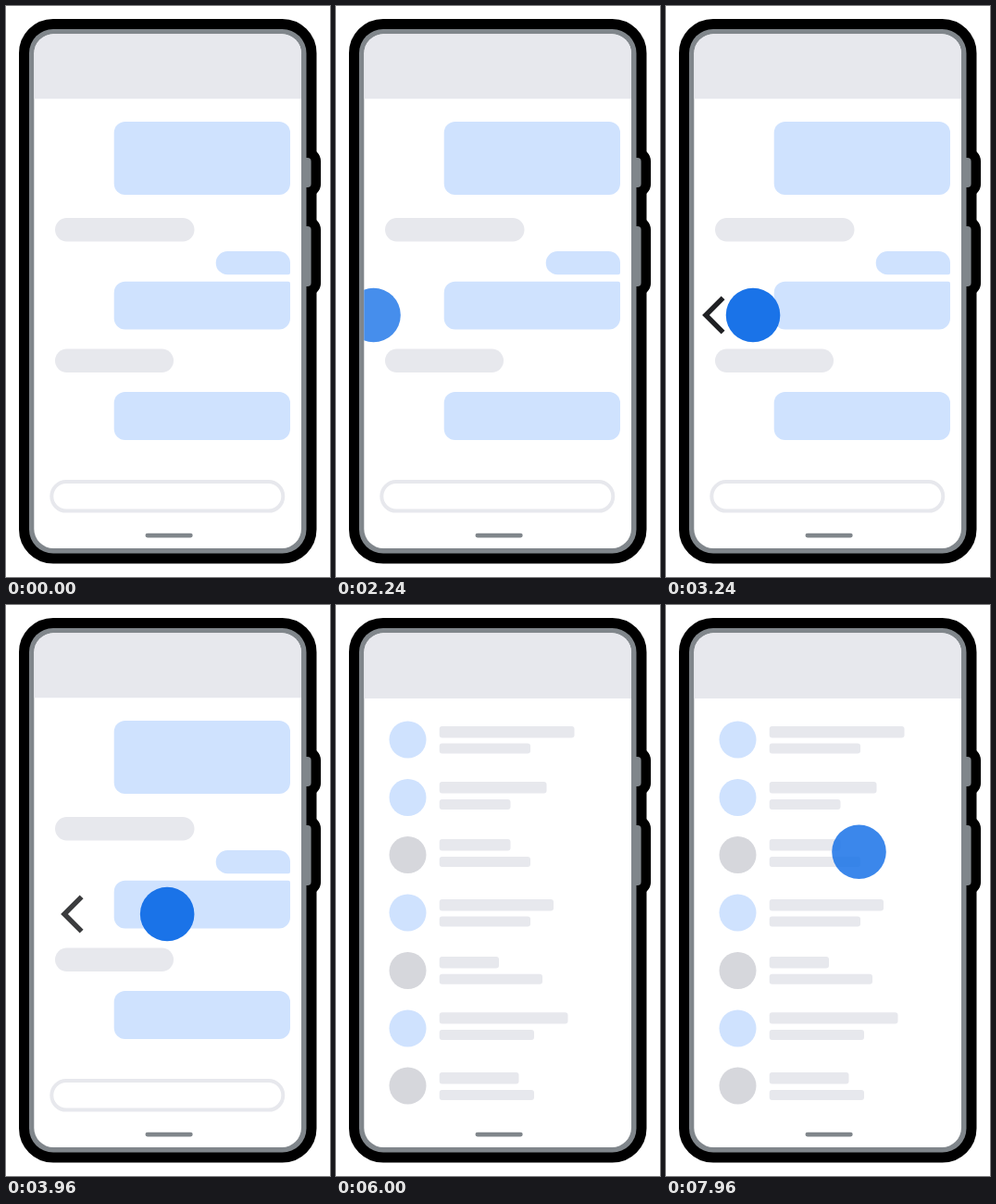
Write an HTML page with a canvas that moves like this. It is 350 by 617 pixels and loops after 8 s.

```html
<!DOCTYPE html>
<html lang="en">
<head>
<meta charset="utf-8">
<title>Back gesture</title>
<style>
html, body { margin: 0; width: 100%; height: 100%; overflow: hidden; background: #fff; }
canvas { display: block; width: 350px; height: 617px; }
</style>
</head>
<body>
<canvas id="stage"></canvas>
<script>
const W = 350, H = 617, LOOP = 8000;
const GREY = '#e7e8ed', MID = '#d6d7dc', PALE = '#cfe2fe', BLUE = '#1a73e8', METAL = '#80868b', INK = '#202124';
const canvas = document.getElementById('stage');
const ctx = canvas.getContext('2d');
const dpr = window.devicePixelRatio || 1;
canvas.width = Math.round(W * dpr);
canvas.height = Math.round(H * dpr);

// Row: centre y, avatar colour, bar offsets from centre, bar right edges
const ROWS = [
  [145.5, PALE, -14.5, 4, 257.5, 210],
  [208, PALE, -17, 2, 227.5, 188.5],
  [270, MID, -17, 2, 188.5, 210],
  [332.5, PALE, -14.5, 4, 235, 210],
  [395, MID, -15, 3.7, 176, 223],
  [457.5, PALE, -17.3, 1.5, 250.5, 214],
  [519.5, MID, -14.5, 4.5, 197.5, 214]
];

const linear = (t, a, b) => Math.min(1, Math.max(0, (t - a) / (b - a)));
const sine = (t, a, b) => 0.5 - 0.5 * Math.cos(Math.PI * linear(t, a, b));
const cubic = (t, a, b) => {
  const x = linear(t, a, b);
  return x < 0.5 ? 4 * x ** 3 : 1 - 4 * (1 - x) ** 3;
};
const out = (t, a, b) => 1 - (1 - linear(t, a, b)) ** 3;

// Rounded box given by its edges
function path(l, t, r, b, radius) {
  ctx.beginPath();
  ctx.roundRect(l, t, r - l, b - t, radius);
}

function box(color, l, t, r, b, radius) {
  path(l, t, r, b, radius);
  ctx.fillStyle = color;
  ctx.fill();
}

function disc(color, x, y, r) {
  ctx.beginPath();
  ctx.arc(x, y, r, 0, Math.PI * 2);
  ctx.fillStyle = color;
  ctx.fill();
}

function layer(alpha, scale, draw) {
  if (alpha <= 0) return;
  ctx.save();
  ctx.globalAlpha = alpha;
  ctx.translate(177, 300);
  ctx.scale(scale, scale);
  ctx.translate(-177, -300);
  draw();
  ctx.restore();
}

function body() {
  const parts = [
    [320, 164, 329.6, 196, 4],
    [320, 238, 329.6, 303, 4],
    [25, 25, 324.5, 591.5, 26]
  ];
  ctx.strokeStyle = '#000';
  for (const p of parts) {
    path(...p);
    ctx.lineWidth = p[4] > 4 ? 22 : 21;
    ctx.stroke();
  }
  for (const p of parts) box(METAL, ...p);
}

function chat() {
  box(PALE, 116.7, 125, 307, 204, 12);
  box(GREY, 53, 229, 203.5, 254.5, 12.7);
  box(PALE, 226.7, 265, 307, 290.3, [12.6, 12.6, 2, 12.6]);
  box(PALE, 116.7, 297.7, 307, 349.5, [12, 2, 12, 12]);
  box(GREY, 53, 370.5, 181, 396, 12.7);
  box(PALE, 116.7, 417, 307, 469, 12);
  path(49.3, 514, 299.3, 545.6, 15.8);
  ctx.strokeStyle = GREY;
  ctx.lineWidth = 4;
  ctx.stroke();
}

function list() {
  for (const [y, color, top, low, end1, end2] of ROWS) {
    disc(color, 77.5, y, 20);
    box(GREY, 111.7, y + top, end1, y + top + 12.4, 3);
    box(GREY, 111.7, y + low, end2, y + low + 11, 3);
  }
}

function arrow(t, drag) {
  const alpha = t < 4920 ? 1 - 0.61 * linear(t, 3720, 4920) : 0.39 * (1 - linear(t, 4920, 5180));
  if (t < 2545 || alpha <= 0) return;
  const reach = 25.6 + 35 * drag - 25 * (1 - out(t, 2545, 3000));
  const x = reach - 55.6 * sine(t, 4200, 5200) + 4;
  ctx.globalAlpha = alpha;
  ctx.strokeStyle = INK;
  ctx.lineWidth = 5.5;
  ctx.beginPath();
  ctx.moveTo(x + 18.6, 315.4);
  ctx.lineTo(x, 334);
  ctx.lineTo(x + 18.6, 352.6);
  ctx.stroke();
  ctx.globalAlpha = 1;
}

function touch(x, y, alpha) {
  if (alpha <= 0) return;
  ctx.globalAlpha = alpha;
  disc(BLUE, x, y, 29.3);
  ctx.globalAlpha = 1;
}

function render(t) {
  ctx.setTransform(dpr, 0, 0, dpr, 0, 0);
  ctx.fillStyle = '#fff';
  ctx.fillRect(0, 0, W, H);
  body();

  ctx.save();
  path(30.3, 30.3, 319, 586, 21);
  ctx.fillStyle = '#fff';
  ctx.fill();
  ctx.clip();

  box(GREY, 30, 30, 320, t < 5080 ? 100.3 : 101, 0);
  layer(1 - linear(t, 4940, 5140), 1 - 0.12 * cubic(t, 4840, 5160), chat);
  layer(linear(t, 5080, 5300), 1.06 - 0.06 * out(t, 5060, 5320), list);
  box(METAL, 150.5, 569.8, 201.7, 574.4, 2.3);

  const drag = sine(t, 2545, 4185);
  arrow(t, drag);
  touch(40.5 + 140 * drag, 334, linear(t, 2080, 2280) * (1 - linear(t, 4200, 4400)));
  touch(208.5, 266.7, linear(t, 7790, 7990));
  ctx.restore();
}

const start = performance.now();
function tick() {
  render((performance.now() - start) % LOOP);
  requestAnimationFrame(tick);
}
tick();
</script>
</body>
</html>
```
